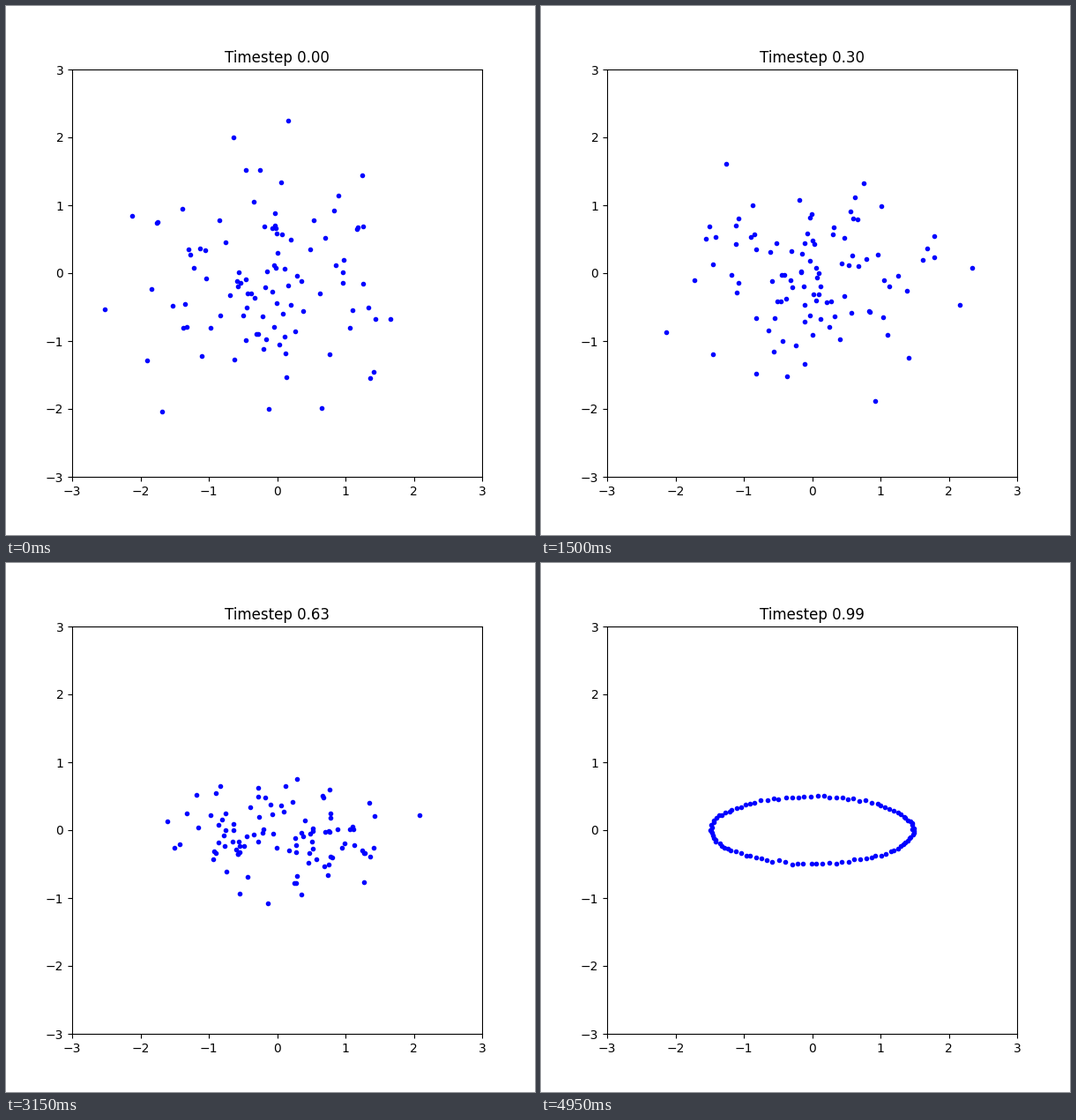
Write a matplotlib script that moves like this. It is 600 px wide and 600 px high and loops after 5000 ms.

```python
import matplotlib.pyplot as plt
import numpy as np
from matplotlib.animation import FuncAnimation

STEPS = 100
COUNT = 100
SEED = 7

theta = np.linspace(0, 2 * np.pi, COUNT)
ellipse = np.column_stack([1.5 * np.cos(theta), 0.5 * np.sin(theta)])


def cloud(step):
    """Blend fresh Gaussian noise into the ellipse."""
    t = step / STEPS
    noise = np.random.default_rng([SEED, step]).standard_normal((COUNT, 2))
    return (1 - t) * noise + t * ellipse


fig, ax = plt.subplots(figsize=(6, 6), dpi=100)
ax.set_xlim(-3, 3)
ax.set_ylim(-3, 3)
dots, = ax.plot([], [], "b.")
title = ax.set_title("Timestep 0.00")


def update(step):
    dots.set_data(*cloud(step).T)
    title.set_text(f"Timestep {step / STEPS:.2f}")
    return dots, title


anim = FuncAnimation(fig, update, frames=STEPS, interval=50, repeat=True)
plt.show()
```
